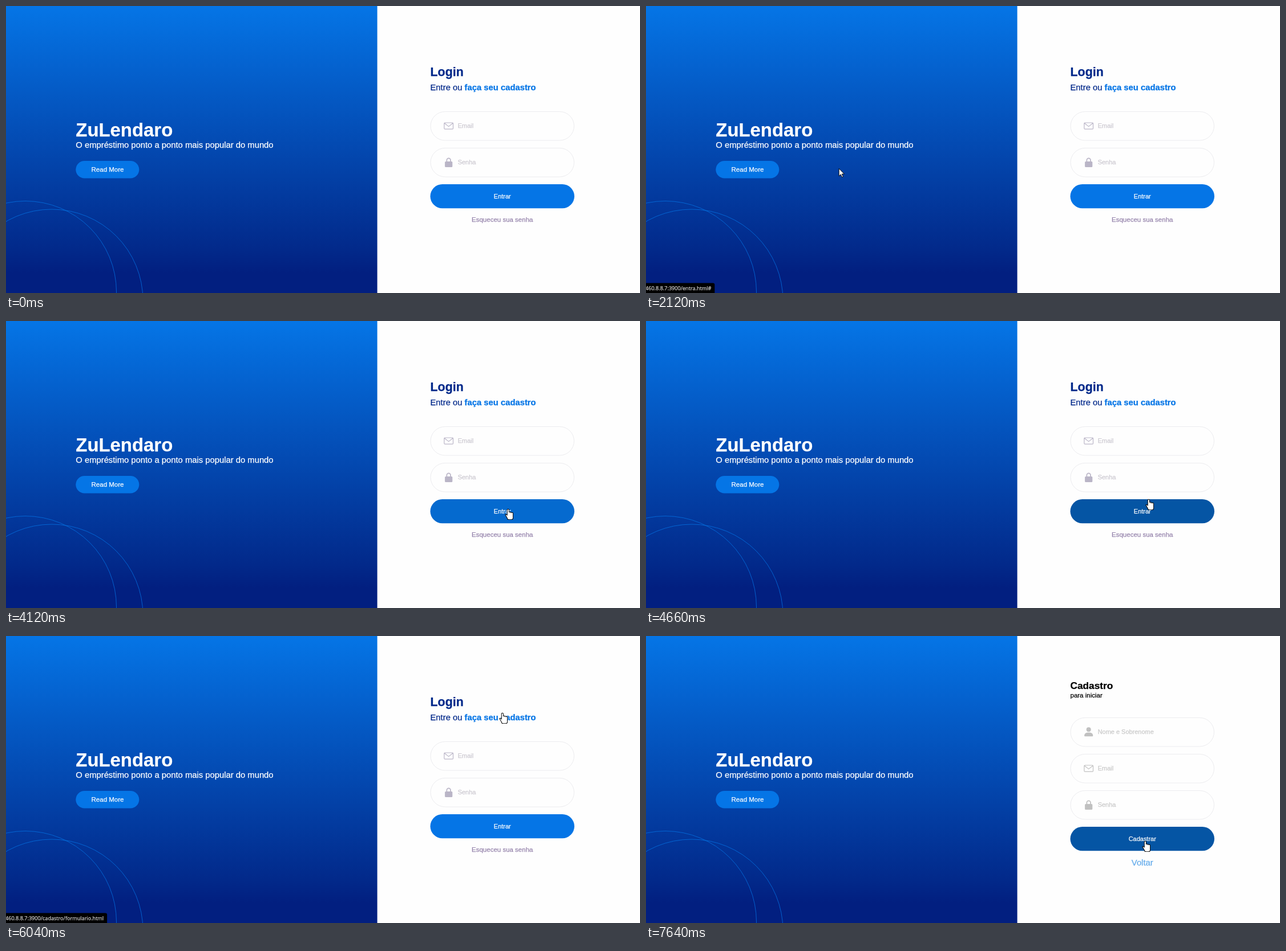
Write an HTML page with a canvas that moves like this. It is 1111 px wide and 504 px high and loops after 8000 ms.

```html
<!DOCTYPE html>
<html lang="pt">
<head>
<meta charset="utf-8">
<title>Login</title>
<style>
html, body { margin: 0; width: 100%; height: 100%; overflow: hidden; background: #fefefe; }
canvas { display: block; width: 1111px; height: 504px; }
</style>
</head>
<body>
<canvas id="stage"></canvas>
<script>
const W = 1111, H = 504, LOOP = 8000, STEP = 70;
const BLUE = [5, 117, 230], DARK = [5, 85, 164];
const SIGNUP_AT = 6260;
const ROW = 64, FORM_X = 743.5, FORM_W = 252.5, MID = FORM_X + FORM_W / 2;
const SANS = '"Liberation Sans", Arial, sans-serif';
const STATUS_FONT = '"Open Sans", "Noto Sans", sans-serif';
const HOST = '460.8.8.7:3900/';

const canvas = document.getElementById('stage');
const ctx = canvas.getContext('2d');
const dpr = window.devicePixelRatio || 1;
canvas.width = W * dpr;
canvas.height = H * dpr;

// Pointer moves in coarse steps; power > 1 eases out, < 1 eases in
const move = (start, steps, x, y, power = 1) => ({ start, steps, x, y, power });
const origin = { x: 749, y: 435 };
const moves = [
  move(460, 4, 546, 418),
  move(1000, 11, 200, 288, 1.3),
  move(1840, 12, 638, 250, 0.7),
  move(2660, 11, 862, 142, 2.4),
  move(3490, 12, 881, 333, 2.3),
  move(4660, 12, 871, 147, 1.3),
  move(5500, 5, 871, 131),
  move(6040, 2, 869, 140),
  move(6660, 9, 869, 326),
  move(7290, 6, 875, 360, 2)
];
const BEND = 0.025;

const statuses = [
  { from: 1840, to: 2660, page: 'entra.html#' },
  { from: 3420, to: 4050, page: 'cadastro/formulario.html' },
  { from: 5500, to: 6450, page: 'cadastro/formulario.html' }
];

const arrow = new Path2D('M.5 .5V16.2L4.2 12.8L6.8 18.6L9.2 17.5L6.7 11.9H11.6Z');

// Thumb, palm and four fingers merged into one silhouette
const hand = new Path2D('M1.6 11.4L3.4 11.8L6 14V19Z');
hand.roundRect(5.4, 9, 10.6, 11.6, 2.4);
for (let i = 0; i < 4; i++) {
  const top = i ? 5.6 + i * 0.7 : 0.8;
  hand.roundRect(5.4 + i * 2.7, top, 2.5, 14 - top, 1.25);
}

// CSS "ease" curve
function ease(p) {
  if (p <= 0) return 0;
  if (p >= 1) return 1;
  const bez = (a, b, u) => 3 * a * u * (1 - u) ** 2 + 3 * b * u * u * (1 - u) + u ** 3;
  let lo = 0, hi = 1;
  for (let i = 0; i < 24; i++) {
    const mid = (lo + hi) / 2;
    if (bez(0.25, 0.25, mid) < p) lo = mid; else hi = mid;
  }
  return bez(0.1, 1, lo);
}

const fade = (t, from) => ease((t - from) / 300);

function buttonColor(k) {
  return `rgb(${BLUE.map((c, i) => Math.round(c + (DARK[i] - c) * k)).join()})`;
}

function text(str, x, y, size, color, { bold, align = 'left', family = SANS } = {}) {
  ctx.font = `${bold ? 'bold ' : ''}${size}px ${family}`;
  ctx.textAlign = align;
  ctx.fillStyle = ctx.strokeStyle = color;
  ctx.lineWidth = 0.25;
  ctx.fillText(str, x, y);
  ctx.strokeText(str, x, y);
}

function pill(x, y, w, h) {
  ctx.beginPath();
  ctx.roundRect(x, y, w, h, h / 2);
}

function ring(x, y, r) {
  ctx.beginPath();
  ctx.arc(x, y, r, 0, Math.PI * 2);
  ctx.stroke();
}

// Icons are centred on the origin
const icons = {
  mail() {
    ctx.lineWidth = 1.2;
    ctx.beginPath();
    ctx.roundRect(-7.8, -5.6, 15.6, 11.2, 1.2);
    ctx.moveTo(-7.4, -4.8);
    ctx.lineTo(0, 1);
    ctx.lineTo(7.4, -4.8);
    ctx.stroke();
  },
  lock() {
    ctx.lineWidth = 1.7;
    ctx.beginPath();
    ctx.arc(0, -4, 3.3, Math.PI, 0);
    ctx.lineTo(3.3, -1);
    ctx.moveTo(-3.3, -4);
    ctx.lineTo(-3.3, -1);
    ctx.stroke();
    ctx.beginPath();
    ctx.roundRect(-6.6, -1.6, 13.2, 10, 1.6);
    ctx.fill();
  },
  person() {
    ctx.beginPath();
    ctx.arc(0, -4.4, 4, 0, Math.PI * 2);
    ctx.fill();
    ctx.beginPath();
    ctx.roundRect(-7.6, 0.8, 15.2, 6.8, [6.5, 6.5, 1.4, 1.4]);
    ctx.fill();
  }
};

function field(y, [icon, label], iconColor, labelColor) {
  pill(FORM_X + 0.5, y + 0.5, FORM_W - 1, 50.5);
  ctx.strokeStyle = '#ececef';
  ctx.lineWidth = 1;
  ctx.stroke();
  ctx.save();
  ctx.translate(775.7, y + 25.6);
  ctx.fillStyle = ctx.strokeStyle = iconColor;
  icons[icon]();
  ctx.restore();
  text(label, 791.7, y + 29.3, 10.96, labelColor);
}

// A column of inputs closed by a submit button
function form(top, rows, iconColor, labelColor, label, hover) {
  rows.forEach((row, i) => field(top + ROW * i, row, iconColor, labelColor));
  const y = top + ROW * rows.length;
  pill(FORM_X, y, FORM_W, 42.3);
  ctx.fillStyle = buttonColor(hover);
  ctx.fill();
  text(label, MID, y + 25, 10.96, '#fff', { align: 'center' });
}

function leftPanel() {
  const g = ctx.createLinearGradient(0, 0, 0, H);
  g.addColorStop(0, '#0575e6');
  g.addColorStop(0.85, '#02298a');
  g.addColorStop(0.93, '#021f80');
  ctx.fillStyle = g;
  ctx.fillRect(0, 0, 650.6, H);
  ctx.strokeStyle = 'rgba(5,117,230,.75)';
  ctx.lineWidth = 1;
  ring(34, 502, 159.5);
  ring(80, 517, 160);
  text('ZuLendaro', 122.3, 229, 32.9, '#fff', { bold: true });
  text('O empréstimo ponto a ponto mais popular do mundo', 122.3, 249, 14.8, '#fff');
  pill(122.3, 272, 111, 30.6);
  ctx.fillStyle = buttonColor(0);
  ctx.fill();
  text('Read More', 178, 291, 11.5, '#fff', { align: 'center' });
}

function loginForm(t) {
  text('Login', FORM_X, 123, 21.4, '#02298a', { bold: true });
  text('Entre ou', FORM_X, 148, 14.8, '#02298a');
  text('faça seu cadastro', 803.6, 148, 14.8, '#0575e6', { bold: true });
  form(185, [['mail', 'Email'], ['lock', 'Senha']], '#bab5c7', '#cbc8d0',
    'Entrar', fade(t, 4055) - fade(t, 4845));
  text('Esqueceu sua senha', MID, 379, 11.5, '#9583ab', { align: 'center' });
}

function signupForm(t) {
  text('Cadastro', FORM_X, 93, 17.25, '#000', { bold: true });
  text('para iniciar', FORM_X, 108, 11.5, '#000');
  form(143, [['person', 'Nome e Sobrenome'], ['mail', 'Email'], ['lock', 'Senha']], '#c0c0c0', '#c8c8c8',
    'Cadastrar', fade(t, 7290));
  text('Voltar', MID, 403, 14.8, '#64abeb', { align: 'center' });
}

function statusBar(t) {
  const s = statuses.find(({ from, to }) => t >= from && t < to);
  if (!s) return;
  const size = 9.1;
  ctx.font = `${size}px ${STATUS_FONT}`;
  const width = ctx.measureText(HOST + s.page).width + 5;
  ctx.fillStyle = '#000';
  ctx.beginPath();
  ctx.roundRect(-4, 486.5, width + 4, 22, 3);
  ctx.fill();
  text(HOST + s.page, -1, 499.3, size, '#d0d0d0', { family: STATUS_FONT });
}

function pointerAt(t) {
  const i = moves.findLastIndex(m => m.start <= t);
  const to = moves[i], from = moves[i - 1] || origin;
  const done = Math.min(1, (Math.floor((t - to.start) / STEP) + 1) / to.steps);
  const k = 1 - (1 - done) ** to.power;
  const dx = to.x - from.x, dy = to.y - from.y;
  const arc = BEND * Math.sin(Math.PI * k);
  return [Math.round(from.x + dx * k - dy * arc), Math.round(from.y + dy * k + dx * arc)];
}

function clickable(x, y, signup) {
  const within = (l, top, r, b) => x >= l && x <= r && y >= top && y <= b;
  if (within(122, 272, 233, 303)) return true;
  if (signup) return within(744, 335, 996, 377);
  return within(804, 130, 929, 152) || within(744, 313, 996, 355);
}

function pointer(t, signup) {
  if (t < moves[0].start) return;
  const [x, y] = pointerAt(t);
  const link = clickable(x, y, signup);
  const shape = link ? hand : arrow;
  const scale = link ? 0.88 : 0.84;
  ctx.save();
  ctx.translate(link ? x - 6 : x - 0.3, y);
  ctx.scale(scale, scale);
  ctx.lineWidth = link ? 2.2 : 1.1;
  ctx.lineJoin = 'round';
  ctx.fillStyle = '#fff';
  ctx.strokeStyle = '#000';
  if (link) {
    ctx.stroke(shape);
    ctx.fill(shape);
  } else {
    ctx.fill(shape);
    ctx.stroke(shape);
  }
  ctx.restore();
}

function draw(now) {
  const t = now % LOOP;
  const signup = t >= SIGNUP_AT;
  ctx.setTransform(dpr, 0, 0, dpr, 0, 0);
  ctx.fillStyle = '#fefefe';
  ctx.fillRect(0, 0, W, H);
  leftPanel();
  (signup ? signupForm : loginForm)(t);
  statusBar(t);
  pointer(t, signup);
  requestAnimationFrame(draw);
}
requestAnimationFrame(draw);
</script>
</body>
</html>
```
